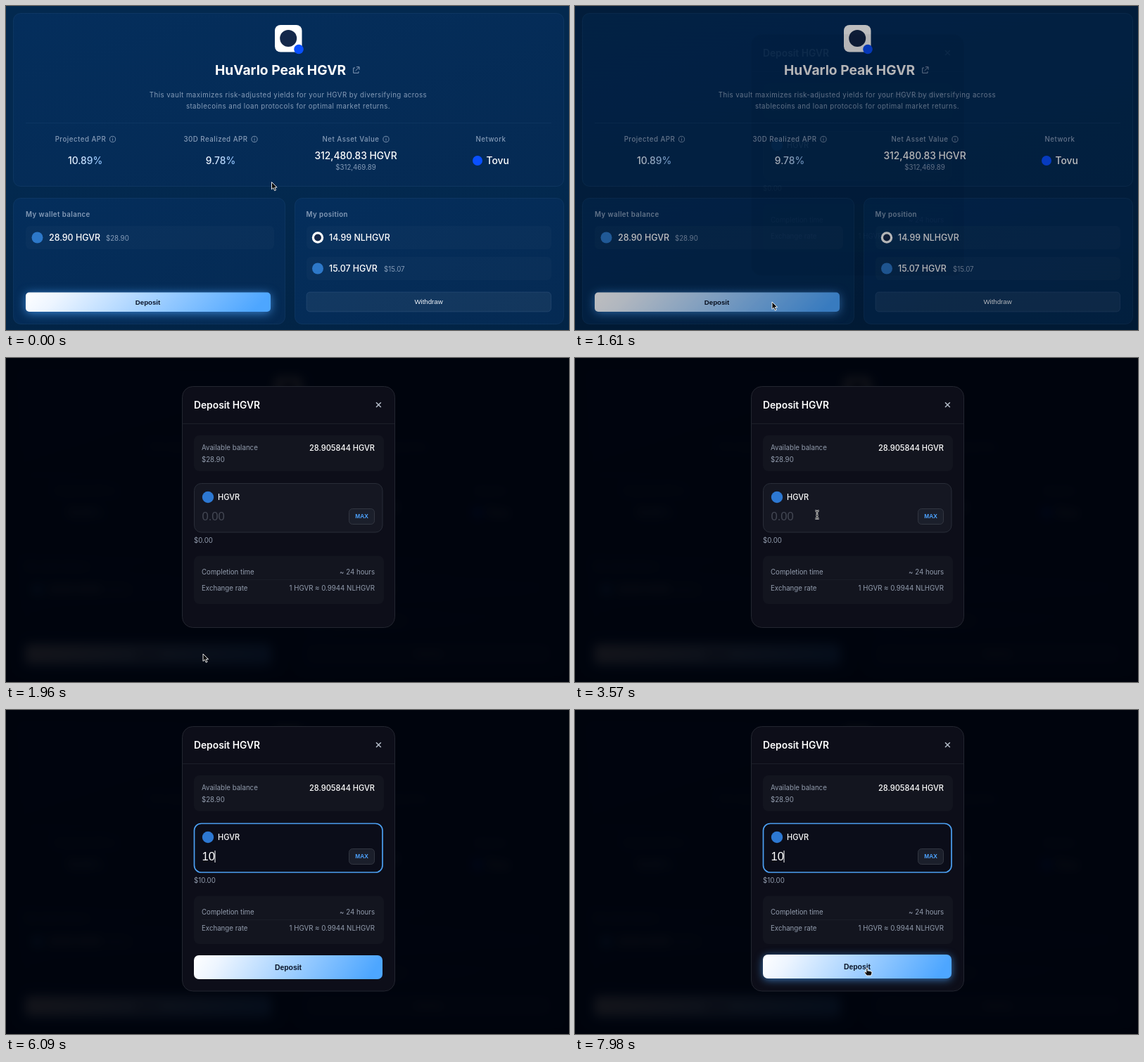
Recreate the animation shown at these times as an HTML page. Size 800 by 461 pixels, loop 8000 ms.

```html
<!DOCTYPE html>
<html lang="en">
<head>
<meta charset="utf-8">
<title>Vault deposit</title>
<style>
html, body { margin: 0; width: 100%; height: 100%; overflow: hidden; background: #03274f; }
svg, #shade { position: absolute; left: 0; top: 0; width: 800px; height: 461px; }
#shade { background: rgba(0, 2, 8, .925); }
text { font-family: Inter, sans-serif; white-space: pre; }
.control { font-family: "Liberation Sans", Arial, sans-serif; }
</style>
</head>
<body>
<svg id="page" viewBox="0 0 800 461"></svg>
<div id="shade"></div>
<svg id="dialog" viewBox="0 0 800 461"></svg>
<svg id="pointer" viewBox="0 0 800 461"></svg>
<script>
const $ = id => document.getElementById(id);
const MUTED = '#869cb8', GREY = '#929cad', WHITE = '#fff';

// Markup helpers
const text = (x, y, str, size, weight, fill, anchor = 'start', spacing = 0, attrs = '') =>
  `<text x="${x}" y="${y}" font-size="${size}" font-weight="${weight}" fill="${fill}" text-anchor="${anchor}" letter-spacing="${spacing}" ${attrs}>${str}</text>`;
const control = (x, y, str, size, weight, fill, anchor = 'middle', attrs = '') =>
  text(x, y, str, size, weight, fill, anchor, 0, `class="control" ${attrs}`);
const box = (x, y, w, h, r, fill, stroke = 'none', attrs = '') =>
  `<rect x="${x}" y="${y}" width="${w}" height="${h}" rx="${r}" fill="${fill}" stroke="${stroke}" ${attrs}/>`;
const dot = (x, y, r, fill) => `<circle cx="${x}" cy="${y}" r="${r}" fill="${fill}"/>`;
const line = (x1, x2, y, stroke) => `<path d="M${x1} ${y}H${x2}" stroke="${stroke}"/>`;
const info = (x, y) => `<g fill="none" stroke="${MUTED}" stroke-width=".9"><circle cx="${x}" cy="${y}" r="4.1"/><path d="M${x} ${y - .4}v2.6M${x} ${y - 2.2}v1"/></g>`;
const label = (x, str, iconX) => text(x, 193, str, 9.7, 500, MUTED, 'middle', .5) + (iconX ? info(iconX, 189.5) : '');
const note = (x, y, str, anchor, attrs) => text(x, y, str, 9.7, 400, GREY, anchor, 0, attrs);
const gradient = (id, coords, stops) =>
  `<linearGradient id="${id}" ${coords}>${stops.map(([o, c]) => `<stop offset="${o}" stop-color="${c}"/>`).join('')}</linearGradient>`;
const card = (x, y, w, h) => box(x, y, w, h, 10, 'url(#card)', 'rgba(90,150,210,.11)');
const row = (x, y, w) => box(x, y, w, 33, 6, 'rgba(255,255,255,.018)');

$('page').innerHTML = `<defs>
  ${gradient('sky', 'x2="0" y2="1"', [[0, '#03294f'], [.55, '#03294f'], [1, '#022446']])}
  ${gradient('card', 'x2="1" y2="1"', [[0, '#042e5c'], [1, '#052a53']])}
  ${gradient('action', 'x2="1" y2=".08"', [[0, '#fff'], [.15, '#edf5ff'], [1, '#4da6ff']])}
  ${gradient('rate', 'x2="1" y2="0"', [[0, '#f4f9ff'], [1, '#86bdfb']])}
  </defs>` +
  box(0, 0, 800, 461, 0, 'url(#sky)') +
  card(10.5, 10.5, 782, 246) + card(10.5, 273.5, 386, 179) + card(410.5, 273.5, 382, 179) +
  line(28, 775, 166.5, 'rgba(120,170,220,.07)') +
  box(382, 27, 38.5, 38.5, 8, WHITE) + dot(401.2, 46, 12, '#14284a') + dot(416, 61.5, 6.8, '#0a50ff') +
  text(390, 98, 'HuVarlo Peak HGVR', 19.2, 700, WHITE, 'middle') +
  `<path d="M496 88h-2.3v7.3h7.3V93M498 86.7h4v4M501.8 87l-5.2 5.2" fill="none" stroke="${MUTED}"/>` +
  text(401, 130, 'This vault maximizes risk-adjusted yields for your HGVR by diversifying across', 9.7, 400, MUTED, 'middle', .45) +
  text(401, 146, 'stablecoins and loan protocols for optimal market returns.', 9.7, 400, MUTED, 'middle', .45) +
  label(106, 'Projected APR', 151.5) + label(298, '30D Realized APR', 353) +
  label(490, 'Net Asset Value', 540) + label(689, 'Network') +
  text(112.5, 225, '10.89%', 13.8, 500, 'url(#rate)', 'middle') +
  text(305, 225, '9.78%', 13.8, 500, 'url(#rate)', 'middle') +
  text(497, 218, '312,480.83 HGVR', 13.8, 500, WHITE, 'middle') +
  text(497, 233, '$312,469.89', 9.7, 400, MUTED, 'middle') +
  dot(670, 220, 7, '#0a50ff') + text(682.5, 225, 'Tovu', 13.8, 500, WHITE) +
  text(28, 299.5, 'My wallet balance', 9.7, 600, MUTED, 'start', .42) +
  text(426.5, 299.5, 'My position', 9.7, 600, MUTED, 'start', .42) +
  row(28, 313, 353) + row(427, 313, 348) + row(427, 357, 348) +
  dot(44.5, 329.5, 8, '#2d78c9') + text(61, 334, '28.90 HGVR', 12.4, 500, WHITE) + text(142, 334, '$28.90', 9.7, 400, MUTED) +
  dot(443, 329.5, 8.2, WHITE) + dot(443, 329.5, 5, '#14284a') + text(459, 334, '14.99 NLHGVR', 12.4, 500, WHITE) +
  dot(443, 373.5, 8, '#2d78c9') + text(459, 378, '15.07 HGVR', 12.4, 500, WHITE) + text(537, 378, '$15.07', 9.7, 400, MUTED) +
  `<g id="open">${box(28, 407.5, 348, 27.5, 5, 'url(#action)')}${control(201.5, 424.7, 'Deposit', 9.66, 700, '#0a1428')}</g>` +
  box(427, 407, 347.5, 28, 5, 'rgba(255,255,255,.055)', 'rgba(150,180,220,.13)') +
  control(600.5, 424.3, 'Withdraw', 9.66, 400, '#f2f6fb');

$('dialog').innerHTML =
  box(250.5, 40.5, 302, 343, 15, '#0d0e19', '#232630', 'id="panel"') +
  line(251, 552, 93.5, '#1c1f29') +
  text(267, 71.8, 'Deposit HGVR', 13.8, 600, WHITE) +
  '<path d="M526 63.2l6.8 6.8M532.8 63.2l-6.8 6.8" stroke="#b5bdc9" stroke-width="1.5"/>' +
  box(267, 110, 270, 51, 8, '#13151f') +
  note(278, 131.3, 'Available balance') + note(278, 147.8, '$28.90') +
  text(524, 132, '28.905844 HGVR', 11.04, 500, WHITE, 'end') +
  box(267.5, 178.5, 267.5, 69.5, 10, '#151722', '#292d38', 'id="field"') +
  dot(287, 198, 8.2, '#2d78d2') + text(301, 202, 'HGVR', 11.04, 500, WHITE) +
  control(278.5, 231.3, '', 16.6, 400, WHITE, 'start', 'id="amount"') +
  '<path id="caret" d="M297 217v17" stroke="#fff"/>' +
  box(487.5, 214.5, 36, 22, 5, '#1b1f2b', '#323641') +
  control(505.5, 228.3, 'MAX', 8.3, 700, '#4da3ff') +
  note(267, 262.8, '', 'start', 'id="value"') +
  box(267, 281.5, 270, 68.5, 8, '#13151f') + line(278, 524, 315.5, '#1a1d27') +
  note(278, 307.5, 'Completion time') + note(524, 307.5, '~ 24 hours', 'end') +
  note(278, 331, 'Exchange rate') + note(524, 331, '1 HGVR ≈ 0.9944 NLHGVR', 'end') +
  `<g id="submit">${box(267, 366, 268, 34, 7, 'url(#action)')}${control(401, 386.8, 'Deposit', 10.4, 700, '#0a1428')}</g>`;

// Pointer shapes, each with its hot spot at 0,0
const beamPath = 'M-2.6-5.6Q0-5.6 0-4 0-5.6 2.6-5.6M0-4.5V4.5M-2.6 5.6Q0 5.6 0 4 0 5.6 2.6 5.6M-1.5 1H1.5';
$('pointer').innerHTML = `
  <g id="arrow"><path d="M0 0V10.4L2.4 8.2 4.2 12.2 6 11.4 4.3 7.6H7.6Z" fill="#050505" stroke="#fff" stroke-width=".9"/></g>
  <g id="hand"><path d="M-1.2 .7Q0-.6 1 .7V4.2Q2.4 3.2 3.2 4.5 4.6 3.7 5.2 5 7 4.4 7 6.2C7 8.6 6 9.4 5.7 11H-.6C-1 9.4-3.2 7.8-4 6-3.6 4.8-2.2 5.2-1.2 6.4Z" fill="#111" stroke="#fff"/></g>
  <g id="beam" fill="none"><path d="${beamPath}" stroke="#fff" stroke-width="2.4"/><path d="${beamPath}" stroke="#000" stroke-width=".8"/></g>`;

const LOOP = 8000, OPEN = 1520, FOCUS = 3740, KEY1 = 5250, KEY2 = 5670, REAPPEAR = 6160;
const ramp = (t, from, to) => Math.min(1, Math.max(0, (t - from) / (to - from)));
const ease = p => p * p * (3 - 2 * p);
const mix = (a, b, p) => a + (b - a) * p;
const set = (id, attrs) => { for (const k in attrs) $(id).setAttribute(k, attrs[k]); };

// Start time, end time, destination
const moves = [[280, 1120, 280, 421], [2590, 3400, 344, 223], [REAPPEAR, 6930, 415, 367]];
function pointerAt(t) {
  let x = 377.5, y = 250.5;
  for (const [from, to, tx, ty] of moves) {
    const p = ease(ramp(t, from, to));
    x = mix(x, tx, p);
    y = mix(y, ty, p);
  }
  return [x, y];
}

function lift(id, hover, glow, alpha) {
  $(id).setAttribute('transform', `translate(0 ${-hover})`);
  $(id).style.filter = alpha ? `drop-shadow(0 2px ${glow}px rgba(77,166,255,${alpha}))` : 'none';
}

function render(t) {
  const typed = t >= KEY1;
  const [x, y] = pointerAt(t);

  const openHover = ramp(t, 960, 1160) - ramp(t, OPEN, OPEN + 80);
  lift('open', openHover, 7 + openHover, .72 + .1 * openHover);
  const fade = ramp(t, OPEN, OPEN + 330);
  $('shade').style.opacity = fade;
  $('shade').style.backdropFilter = `blur(${7 * fade * fade}px)`;
  $('dialog').style.opacity = fade ** 2.4;

  $('dialog').style.transform = `translateY(${typed ? -17 : 0}px)`;
  set('panel', { height: typed ? 376.5 : 343 });
  const glow = ramp(t, FOCUS, FOCUS + 200);
  set('field', {
    fill: `rgb(${mix(21, 11, glow)},${mix(23, 13, glow)},${mix(34, 25, glow)})`,
    stroke: `rgb(${mix(41, 76, glow)},${mix(45, 160, glow)},${mix(56, 242, glow)})`,
    'stroke-width': 1 + .7 * glow
  });
  const amount = t >= KEY2 ? '10' : typed ? '1' : '';
  $('amount').textContent = amount || '0.00';
  set('amount', { fill: amount ? WHITE : '#444854' });
  $('value').textContent = `$${amount || 0}.00`;

  const since = t - (t >= KEY2 ? KEY2 : typed ? KEY1 : FOCUS);
  const caretOn = t >= FOCUS && Math.floor(since / 530) % 2 === 0;
  set('caret', { opacity: caretOn ? 1 : 0, transform: `translate(${9.25 * (amount.length - 2)} 0)` });

  const submitHover = ramp(t, 6830, 7030);
  $('submit').style.opacity = typed ? 1 : 0;
  lift('submit', submitHover, 6, .65 * submitHover);

  const shift = typed ? 17 : 0;
  const overButton = t < OPEN ? y > 407 : typed && y > 349;
  const overField = t > OPEN && y > 178 - shift && y < 248 - shift;
  const shape = overButton ? 'hand' : overField ? 'beam' : 'arrow';
  for (const id of ['arrow', 'hand', 'beam'])
    set(id, { transform: `translate(${x} ${y})`, visibility: id === shape ? 'visible' : 'hidden' });
  $('pointer').style.opacity = typed && t < REAPPEAR ? 0 : 1;
}

function tick() {
  render(performance.now() % LOOP);
  requestAnimationFrame(tick);
}
tick();
</script>
</body>
</html>
```
